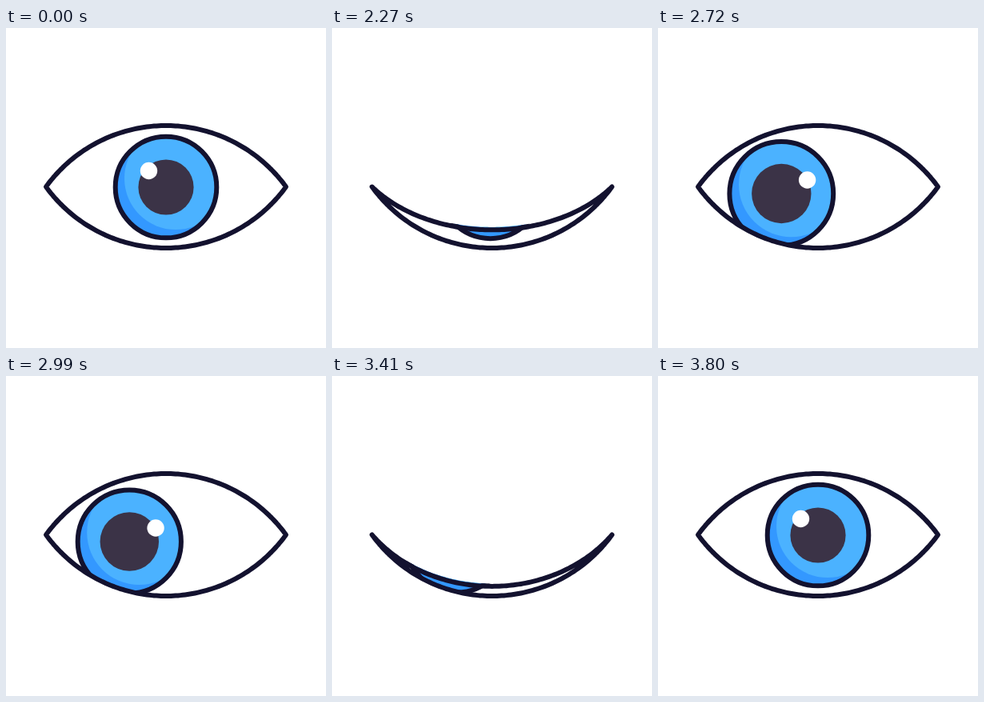
An HTML page with a canvas for the animation above (3.83 s loop, 400x400 px).

```html
<!DOCTYPE html>
<html lang="en">
<head>
<meta charset="utf-8">
<title>Blinking eye</title>
<style>
html, body { margin: 0; width: 100%; height: 100%; overflow: hidden; background: #fff; }
canvas { display: block; width: 400px; height: 400px; }
</style>
</head>
<body>
<canvas id="stage"></canvas>
<script>
const LOOP = 3830, HOLD = 2030, STEP = 30;
const INK = '#13122f', LIGHT = '#4bb2ff', SHADE = '#3398ff', PUPIL = '#3b3347';
const MID = 198.5, OPEN = 122, LIFT = 117, SHUT = 271, LOWER = 275;
const HALF = 150, SAG = 76.5;
const RADIUS = (HALF * HALF + SAG * SAG) / (2 * SAG);

const canvas = document.getElementById('stage');
const ctx = canvas.getContext('2d');
const dpr = window.devicePixelRatio || 1;
canvas.width = canvas.height = 400 * dpr;
ctx.scale(dpr, dpr);

const mix = (a, b, k) => a + (b - a) * k;
function ease(t, from, to) {
  const x = Math.min(1, Math.max(0, (t - from) / (to - from)));
  return x * x * (3 - 2 * x);
}

// Height of the upper lid's middle, for time since the blink began
function blink(t) {
  if (t < 90) return mix(OPEN, LIFT, ease(t, 0, 90));
  if (t < 450) return mix(LIFT, SHUT, ease(t, 90, 320));
  return mix(SHUT, OPEN, ease(t, 450, 678));
}

// Arc between the corners, squashed so that its middle lies at y
function lid(y, dir = 1, shift = 0) {
  for (let i = -HALF; i <= HALF; i += 3) {
    const x = i * dir;
    const h = SAG - RADIUS + Math.sqrt(RADIUS * RADIUS - x * x);
    ctx.lineTo(200 + x, MID + (y - MID) * h / SAG + shift);
  }
}

function disc(x, y, r, fill) {
  ctx.beginPath();
  ctx.arc(x, y, r, 0, 2 * Math.PI);
  ctx.fillStyle = fill;
  ctx.fill();
}

function iris(x, y, swell) {
  const k = 1 + 0.025 * swell;
  ctx.save();
  disc(x, y, 63.3 * k, SHADE);
  ctx.clip();
  disc(x + 12 * k, y - 11 * k, 64 * k, LIGHT);
  ctx.restore();
  ctx.beginPath();
  ctx.arc(x, y, 63.3 * k, 0, 2 * Math.PI);
  ctx.stroke();
  disc(x, y, 34.6 + 2.6 * swell, PUPIL);
}

function draw(t) {
  const top = blink(t < 2900 ? t - 2000 : t - 3122);
  const look = ease(t, 2220, 2620) - ease(t, 3370, 3720);
  const swell = ease(t, 2000, 2700) - ease(t, 2700, 3800);

  ctx.clearRect(0, 0, 400, 400);
  ctx.lineWidth = 6;
  ctx.lineJoin = ctx.lineCap = 'round';
  ctx.strokeStyle = INK;

  ctx.save();
  ctx.beginPath();
  lid(top, 1, -3.4);
  lid(LOWER, -1);
  ctx.clip();
  iris(mix(200, 154.3, look), mix(199, 207, look), swell);
  disc(mix(178.5, 189.4, look) - 2.8 * swell, mix(178.5, 190, look), 10.7, '#fff');
  ctx.restore();

  ctx.beginPath();
  lid(top);
  lid(LOWER, -1);
  ctx.closePath();
  ctx.stroke();
}

const start = performance.now();
function tick() {
  const t = (performance.now() - start) % LOOP;
  draw(t < HOLD ? 0 : HOLD + Math.floor((t - HOLD) / STEP) * STEP);
  requestAnimationFrame(tick);
}
tick();
</script>
</body>
</html>
```
